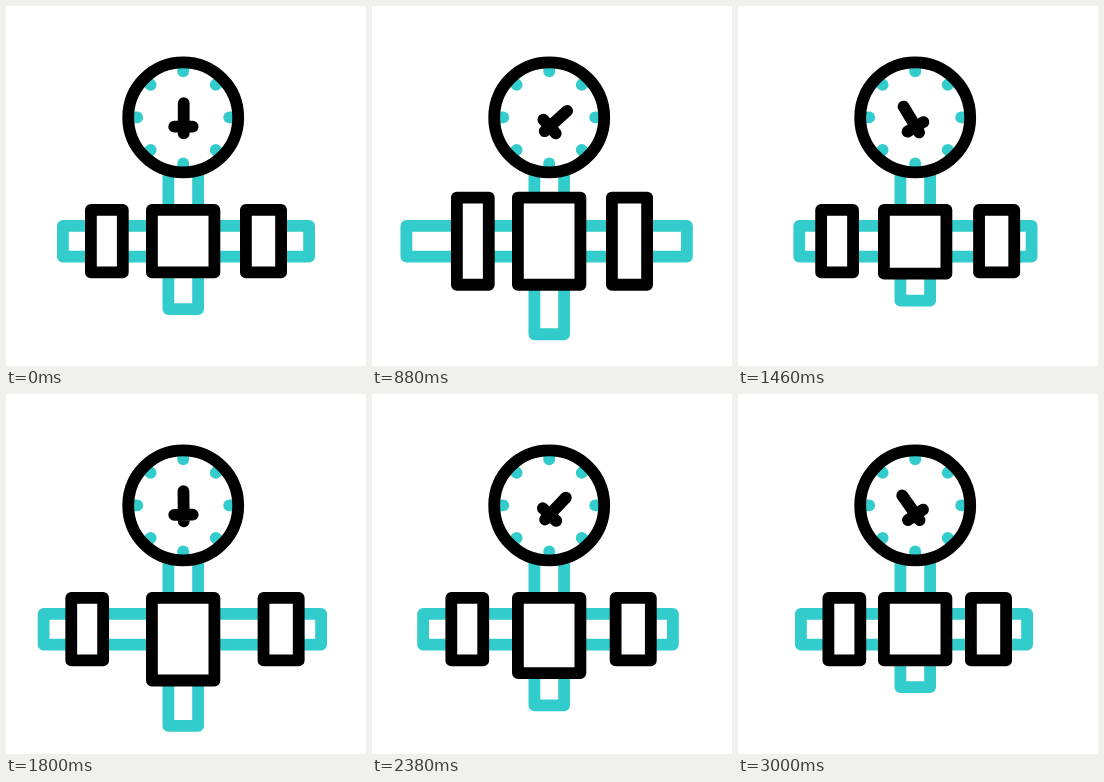
Animation of 360 by 360 pixels, one loop 3020 ms. Source, as an HTML page:

```html
<!DOCTYPE html>
<html>
<head>
<meta charset="utf-8">
<style>
html, body { margin: 0; width: 100%; height: 100%; overflow: hidden; background: #fff; }
svg { display: block; width: 100%; height: 100%; }
svg * { stroke-width: 11.8; stroke-linejoin: round; stroke-linecap: round; }
.pipe { stroke: #3cc; fill: #fff; }
.part { stroke: #000; fill: #fff; }
</style>
</head>
<body>
<svg viewBox="0 0 360 360">
  <rect id="stem" class="pipe"/>
  <rect id="bar" class="pipe"/>
  <rect id="left" class="part"/>
  <rect id="right" class="part"/>
  <rect id="body" class="part"/>
  <circle cx="177.2" cy="111.4" r="55" fill="#fff"/>
  <g id="ticks" class="pipe" transform="translate(177.2 111.4)"></g>
  <circle cx="177.2" cy="111.4" r="55" fill="none" stroke="#000"/>
  <path id="hand" d="M0-23.5V6.7M-9.5 0H9" stroke="#000"/>
</svg>
<script>
const LOOP = 3020;
const STROKE = 11.8;
const $ = id => document.getElementById(id);

$('ticks').innerHTML = Array.from({length: 8}, (_, i) =>
  `<path d="M0-46V-54" transform="rotate(${i * 45})"/>`).join('');

// Sine-eased track through matching times and values
function track(times, values, t) {
  if (t >= times[times.length - 1]) return values[values.length - 1];
  const i = times.findIndex(x => x > t) - 1;
  const p = (t - times[i]) / (times[i + 1] - times[i]);
  return values[i] + (values[i + 1] - values[i]) * (1 - Math.cos(p * Math.PI)) / 2;
}

// Places a stroked rect by its outer edges
function place(id, x1, y1, x2, y2) {
  const r = $(id);
  r.setAttribute('x', x1 + STROKE / 2);
  r.setAttribute('y', y1 + STROKE / 2);
  r.setAttribute('width', x2 - x1 - STROKE);
  r.setAttribute('height', y2 - y1 - STROKE);
}

const PULSE = [0, 200, 800, 1370, 2005, 2640];
const DROP = [0, 1370, 2030, 2700];
const SWING = [0, 190, 890, 1540, 2190, 2850];

function draw(t) {
  const pulse = (...v) => track(PULSE, v, t);
  const grow = pulse(0, 0, 13, 0, 0, 0);
  const top = 198 - grow, bottom = 272.3 + grow;
  const lx = pulse(79, 79, 79, 78.5, 53.5, 84.5);
  const rx = pulse(234, 234, 234, 234, 257, 227);

  place('stem', 156.5, 150, 198, pulse(309, 299, 336, 298, 350, 299));
  place('bar', pulse(51, 57.5, 27, 57, 24, 57), 214, pulse(309, 303, 322, 298, 328, 295), 256.5);
  place('left', lx, top, lx + 43.7, bottom);
  place('right', rx, top, rx + 47, bottom);
  place('body', 140, top, 214.3, bottom + track(DROP, [0, 0, 27.5, 0], t));

  const angle = track(SWING, [0, -35, 48, -34, 62, -35], t);
  $('hand').setAttribute('transform', `translate(177.7 120.7) rotate(${angle})`);
}

const start = performance.now();
function frame() {
  draw((performance.now() - start) % LOOP);
  requestAnimationFrame(frame);
}
frame();
</script>
</body>
</html>
```
